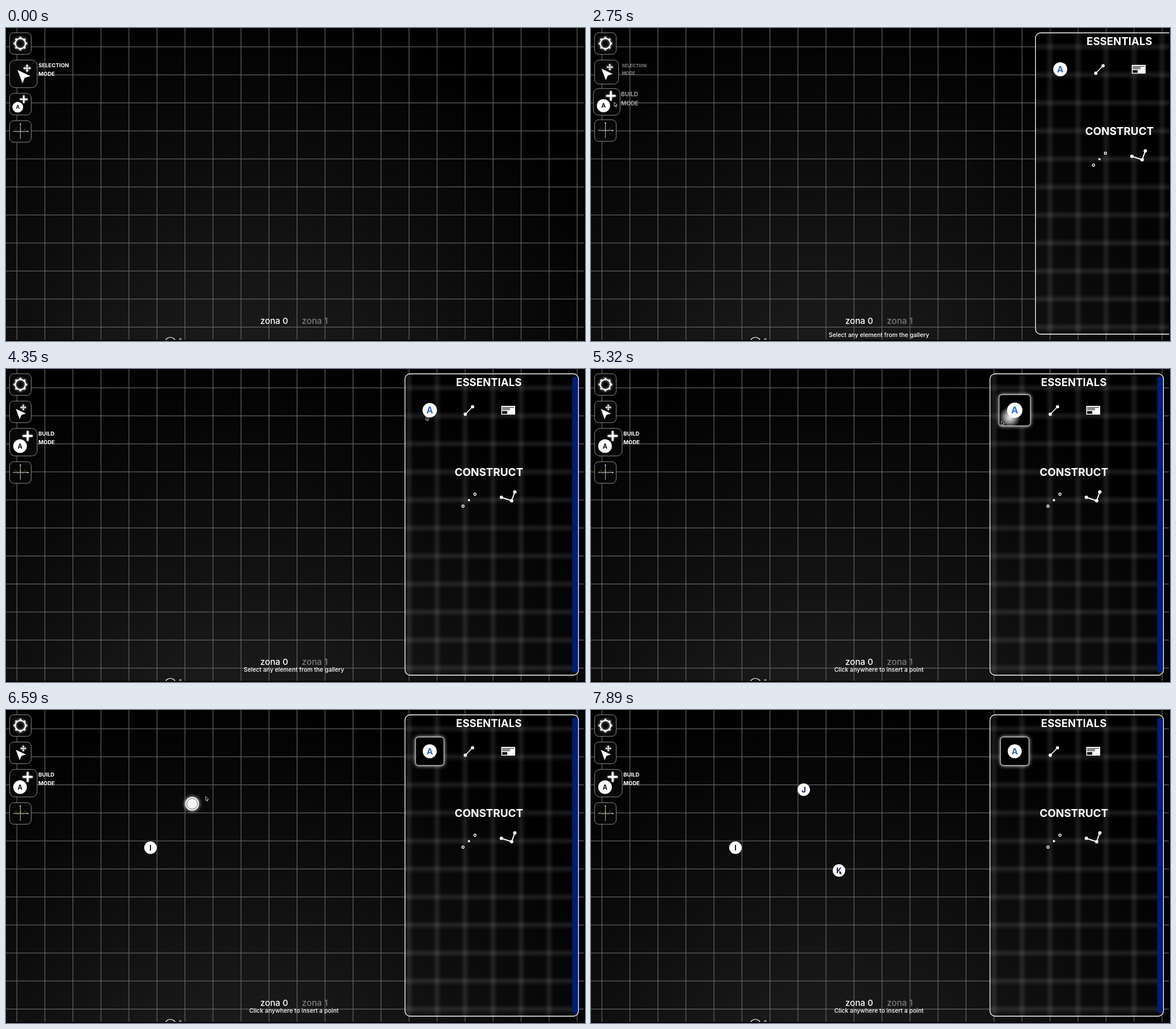
Animation of 1018x550 px, one loop 8000 ms. Source, as an HTML page with a canvas:

```html
<!DOCTYPE html>
<html lang="en">
<head>
<meta charset="utf-8">
<title>Geometry board</title>
<style>
html, body { margin: 0; width: 100%; height: 100%; overflow: hidden; background: #000; }
canvas { display: block; width: 1018px; height: 550px; }
</style>
</head>
<body>
<canvas id="stage" width="1018" height="550"></canvas>
<script>
const W = 1018, H = 550, LOOP = 8000, CELL = 49.25;
const ctx = document.getElementById('stage').getContext('2d');
const FONT = 'Inter, "Open Sans", sans-serif';

// Pointer path: time, x, y
const PATH = [
  [760, 1017, 320], [1150, 610, 268], [1510, 254, 184], [1580, 220, 169.5],
  [1900, 92, 143], [2250, 40.5, 130], [3260, 40.5, 130], [3620, 390, 118],
  [4000, 713, 93], [4350, 738, 82.5], [4830, 735, 87], [5200, 730, 89],
  [5320, 721, 91], [5590, 455, 153], [5680, 379, 170], [6040, 254, 242],
  [6240, 254, 242], [6430, 306, 187], [6500, 327, 165], [6590, 350.5, 151.5],
  [6800, 374, 140], [7020, 374, 140], [7250, 414, 209], [7340, 426, 241],
  [7600, 436, 281.5], [8000, 436, 281.5]
];
const POINTS = [
  { name: 'I', x: 254, y: 242, at: 6130 },
  { name: 'J', x: 374, y: 140, at: 6910 },
  { name: 'K', x: 436, y: 282, at: 7720 }
];

const mix = (a, b, k) => a + (b - a) * k;
const part = (t, start, len) => Math.min(1, Math.max(0, (t - start) / len));
const ease = (t, start, len) => 1 - Math.pow(1 - part(t, start, len), 2.2);
const rgb = (a, b, k) => `rgb(${a.map((v, i) => Math.round(mix(v, b[i], k))).join()})`;

function slope(i, c) {
  if (i === 0 || i === PATH.length - 1) return 0;
  const [p, q, r] = [PATH[i - 1], PATH[i], PATH[i + 1]];
  const a = (q[c] - p[c]) / (q[0] - p[0]), b = (r[c] - q[c]) / (r[0] - q[0]);
  return a * b > 0 ? 2 * a * b / (a + b) : 0;
}

function pointer(t) {
  let i = 0;
  while (i < PATH.length - 2 && t >= PATH[i + 1][0]) i++;
  const p = PATH[i], q = PATH[i + 1], len = q[0] - p[0], u = part(t, p[0], len);
  const at = c => (1 + 2 * u) * (1 - u) ** 2 * p[c] + u * (1 - u) ** 2 * len * slope(i, c)
    + u * u * (3 - 2 * u) * q[c] + u * u * (u - 1) * len * slope(i + 1, c);
  return { x: at(1), y: at(2) };
}

function line(pts, width, color, close) {
  ctx.beginPath();
  pts.forEach(([x, y]) => ctx.lineTo(x, y));
  if (close) ctx.closePath();
  ctx.lineWidth = width;
  ctx.strokeStyle = color;
  ctx.stroke();
}

function shape(pts, color) {
  ctx.beginPath();
  pts.forEach(([x, y]) => ctx.lineTo(x, y));
  ctx.fillStyle = color;
  ctx.fill();
}

function disc(x, y, r, color = '#fff') {
  ctx.beginPath();
  ctx.arc(x, y, r, 0, 7);
  ctx.fillStyle = color;
  ctx.fill();
}

function ring(x, y, r, width, color = '#fff') {
  ctx.beginPath();
  ctx.arc(x, y, r, 0, 7);
  ctx.lineWidth = width;
  ctx.strokeStyle = color;
  ctx.stroke();
}

function round(x, y, w, h, r) {
  ctx.beginPath();
  ctx.roundRect(x, y, w, h, r);
}

// Text with its capitals centred on y
function label(str, x, y, size, weight, color = '#fff', align = 'center') {
  ctx.font = `${weight} ${size}px ${FONT}`;
  ctx.textAlign = align;
  ctx.fillStyle = color;
  ctx.fillText(str, x, y + size * 0.363);
}

function glow(blur, color = '#fff') {
  ctx.shadowBlur = blur;
  ctx.shadowColor = color;
}

function backdrop() {
  ctx.fillStyle = '#000';
  ctx.fillRect(0, 0, W, H);
  const g = ctx.createRadialGradient(410, 720, 0, 410, 720, 760);
  g.addColorStop(0, '#222');
  g.addColorStop(1, '#000');
  ctx.fillStyle = g;
  ctx.fillRect(0, 0, 1016, 548);
}

function grid() {
  ctx.fillStyle = '#6c6c6c';
  for (let x = 18.6; x < 1016; x += CELL) ctx.fillRect(x, 0, 1.1, 548);
  for (let y = 32.5; y < 548; y += CELL) ctx.fillRect(0, y, 1016, 1.1);
}

function band(x, y, w, h, vertical) {
  const g = vertical ? ctx.createLinearGradient(x, 0, x + w, 0) : ctx.createLinearGradient(0, y, 0, y + h);
  [0, 0.1, 0, 0.035, 0.035].slice(0, 3).forEach((a, i) => g.addColorStop(i / 2, `rgba(255,255,255,${a})`));
  ctx.fillStyle = g;
  ctx.fillRect(x, y, w, h);
}

function footer() {
  ctx.save();
  ctx.beginPath();
  ctx.rect(0, 0, W, 548);
  ctx.clip();
  ring(289, 553, 9.5, 1.2);
  ring(306.5, 547, 1.4, 1);
  ctx.restore();
  label('zona 0', 471.5, 514.5, 15.2, 500);
  label('zona 1', 543, 514.5, 15.2, 500, '#7c7c7c');
}

function gear() {
  glow(4, 'rgba(255,255,255,.7)');
  ring(0, 0, 9, 2.2);
  for (let i = 0; i < 8; i++) {
    const a = i * Math.PI / 4, c = Math.cos(a), s = Math.sin(a);
    line([[c * 9, s * 9], [c * 12, s * 12]], 3, '#fff');
  }
  glow(0);
}

function arrowIcon() {
  shape([[-8, -5.4], [9.8, 3], [1.8, 5.4], [-1.2, 13]], '#fff');
  ctx.save();
  ctx.translate(5.1, -7.8);
  glow(3);
  for (let i = 0; i < 4; i++) {
    line([[0, 0], [0, -4]], 1.1, '#fff');
    shape([[-1.9, -2.9], [0, -5.2], [1.9, -2.9]], '#fff');
    ctx.rotate(Math.PI / 2);
  }
  ctx.restore();
}

function buildIcon() {
  glow(3);
  line([[-0.9, -8.6], [12.7, -8.6]], 2.4, '#fff');
  line([[5.9, -15.4], [5.9, -1.8]], 2.4, '#fff');
  glow(0);
  disc(-4.6, 5.4, 9.4);
  label('A', -4.6, 5.4, 8.8, 700, '#111');
}

function graphIcon(tint) {
  const wave = [];
  for (let x = -11; x <= 11; x += 0.5) wave.push([x, -1.2 + 3.4 * Math.cos(x * 0.75 + Math.PI)]);
  line(wave, 0.8, rgb([64, 64, 64], [104, 92, 34], tint));
  line([[-13, 0], [13, 0]], 0.9, '#ddd');
  line([[0, -13], [0, 13]], 0.9, '#ddd');
  disc(13, 0, 1.1);
  disc(0, -13, 1.1);
}

function button(top, size, scale, icon, arg) {
  const cx = 6 + size / 2, cy = top + size / 2, s = size * scale;
  round(cx - s / 2 + 0.3, cy - s / 2 + 0.3, s, s, 7.5 * s / 38);
  ctx.fillStyle = '#070707';
  ctx.fill();
  ctx.lineWidth = 1;
  ctx.strokeStyle = '#8c8c8c';
  ctx.stroke();
  ctx.save();
  ctx.translate(cx + 0.3, cy + 0.3);
  ctx.scale(s / 38, s / 38);
  icon(arg);
  ctx.restore();
}

function modeText(word, x, y, size, alpha) {
  if (alpha <= 0) return;
  ctx.globalAlpha = alpha;
  label(word, x, y - size * 0.79, size, 700, '#fff', 'left');
  label('MODE', x, y + size * 0.79, size, 700, '#fff', 'left');
  ctx.globalAlpha = 1;
}

function toolbar(t) {
  const off = ease(t, 2430, 940), on = ease(t, 2564, 800);
  const hover = mix(1, 1.1, ease(t, 2130, 220) - ease(t, 3350, 350));
  const a = mix(48.5, 38, off), b = mix(38, 48.5, on);
  const bTop = 56 + a + 10, drop = g => -6.8 * (0.4 + 0.6 * g);
  button(8, 38, 1, gear);
  button(56, a, 1, arrowIcon);
  button(bTop, b, hover, buildIcon);
  button(bTop + b + 10, 38, 1, graphIcon, part(t, 2800, 800));
  modeText('SELECTION', 6 + a + mix(2.5, 8.3, off), 56 + a / 2 + drop(1 - off),
    9.5 * mix(1, 0.69, off), 1 - Math.pow(off, 1.4));
  modeText('BUILD', 6 + b / 2 + (b / 2 + mix(1.3, 2.5, on)) * hover, bTop + b / 2 + drop(on) * hover,
    9.5 * mix(0.95, 1, on) * hover, Math.pow(on, 0.6));
}

function pointTool(t) {
  const h = ease(t, 4290, 420) - ease(t, 5340, 380);
  const lit = ease(t, 4360, 420) - ease(t, 5340, 350);
  const picked = ease(t, 4780, 280);
  const s = mix(50, 55, h);
  ctx.save();
  ctx.translate(745, 72.5);
  const box = () => round(-s / 2, -s / 2, s, s, 5);
  if (picked > 0) {
    ctx.globalAlpha = picked;
    box();
    ctx.fillStyle = '#000';
    glow(7);
    ctx.fill();
    glow(0);
    ctx.lineWidth = 1.3;
    ctx.strokeStyle = '#b8b8b8';
    ctx.stroke();
    ctx.globalAlpha = 1;
  }
  if (lit > 0) {
    const p = pointer(Math.min(t, 5340) - 250);
    const x = p.x - 741, y = p.y - 76;
    ctx.save();
    box();
    ctx.clip();
    ctx.globalAlpha = lit;
    const g = ctx.createRadialGradient(x, y, 0, x, y, 19);
    g.addColorStop(0, 'rgba(255,255,255,.95)');
    g.addColorStop(0.45, 'rgba(255,255,255,.6)');
    g.addColorStop(1, 'rgba(255,255,255,0)');
    ctx.fillStyle = g;
    ctx.fillRect(-30, -30, 60, 60);
    ctx.restore();
  }
  ctx.scale(s / 50, s / 50);
  disc(0, 0, 12.3);
  label('A', 0, 0, 15, 700, rgb([62, 97, 182], [44, 110, 226], h));
  ctx.restore();
}

function panelIcons() {
  line([[807.5, 79.5], [820.3, 66.3]], 1.6, '#fff');
  disc(807.5, 79.5, 2.9);
  disc(820.3, 66.3, 2.9);

  ctx.fillStyle = '#fff';
  ctx.fillRect(870.8, 64.8, 24.4, 15.4);
  ctx.fillStyle = '#0a0a0a';
  ctx.fillRect(872.3, 67, 21, 0.9);
  ctx.fillRect(872.3, 69, 14, 1);
  ctx.fillRect(872.3, 71.2, 14, 1);
  ctx.fillRect(872.3, 74, 9, 4.7);

  ring(803.5, 241, 2, 1.3);
  disc(814, 230.5, 2);
  ring(824.5, 220, 2, 1.3);

  const bend = [[871, 225.5], [889, 231.5], [894.6, 216]];
  line(bend, 2, '#fff');
  bend.forEach(([x, y]) => disc(x, y, 3));
}

function panel(t) {
  if (t < 2430) return;
  const shift = 317 * (1 - ease(t, 2430, 690)), left = 701.5 + shift;
  const frame = () => round(left, 8.5, 305, 529.5, 9);
  ctx.save();
  frame();
  ctx.clip();
  backdrop();
  for (let x = 19; x < 1016; x += CELL) if (x > left - 10) band(x - 8, 0, 16, H, true);
  for (let y = 33; y < 548; y += CELL) band(left, y - 8, 305, 16, false);
  ctx.translate(shift, 0);
  round(995.5, 14, 11, 518, 3);
  ctx.fillStyle = '#021c78';
  ctx.fill();
  ctx.restore();

  frame();
  ctx.lineWidth = 1.3;
  ctx.strokeStyle = '#fff';
  ctx.stroke();

  ctx.save();
  ctx.translate(shift, 0);
  label('ESSENTIALS', 849, 23.5, 18.6, 700);
  label('CONSTRUCT', 849, 181, 18.9, 700);
  pointTool(t);
  panelIcons();
  ctx.restore();
}

function message(t) {
  if (t < 2430) return;
  const str = t < 4780 ? 'Select any element from the gallery' : 'Click anywhere to insert a point';
  label(str, 506.2, 528.3 + 44 * (1 - ease(t, 2430, 690)), 10.45, 500);
}

function points(t) {
  const live = POINTS.filter(p => t >= p.at);
  const ghost = pointer(t - 90);
  const busy = live.some(p => Math.hypot(p.x - ghost.x, p.y - ghost.y) < 11);
  if (t > 5300 && ghost.x < 690 && !busy) {
    glow(6);
    disc(ghost.x, ghost.y, 12, '#f4f8f8');
    glow(0);
    ring(ghost.x, ghost.y, 9.4, 0.9, '#555');
  }
  for (const p of live) {
    const k = mix(0.8, 1, ease(t, p.at, 150));
    disc(p.x, p.y, 11 * k);
    label(p.name, p.x, p.y, 13 * k, 700, '#0c1038');
  }
}

function cursor(t) {
  if (t < PATH[0][0]) return;
  const p = pointer(t);
  const pts = [[0, 0], [0, 7.2], [1.6, 5.8], [2.8, 8.5], [4.1, 7.9], [3, 5.3], [5.2, 5.2]]
    .map(([x, y]) => [p.x + x + 0.4, p.y + y + 0.4]);
  shape(pts, '#000');
  line(pts, 0.8, '#e8e8e8', true);
}

function draw(now) {
  const t = now % LOOP;
  backdrop();
  grid();
  footer();
  points(t);
  toolbar(t);
  panel(t);
  message(t);
  ctx.fillStyle = '#000';
  ctx.fillRect(1016.5, 0, 2, H);
  ctx.fillRect(0, 548.5, W, 2);
  cursor(t);
}

const start = performance.now();
function tick() {
  draw(performance.now() - start);
  requestAnimationFrame(tick);
}
tick();
</script>
</body>
</html>
```
